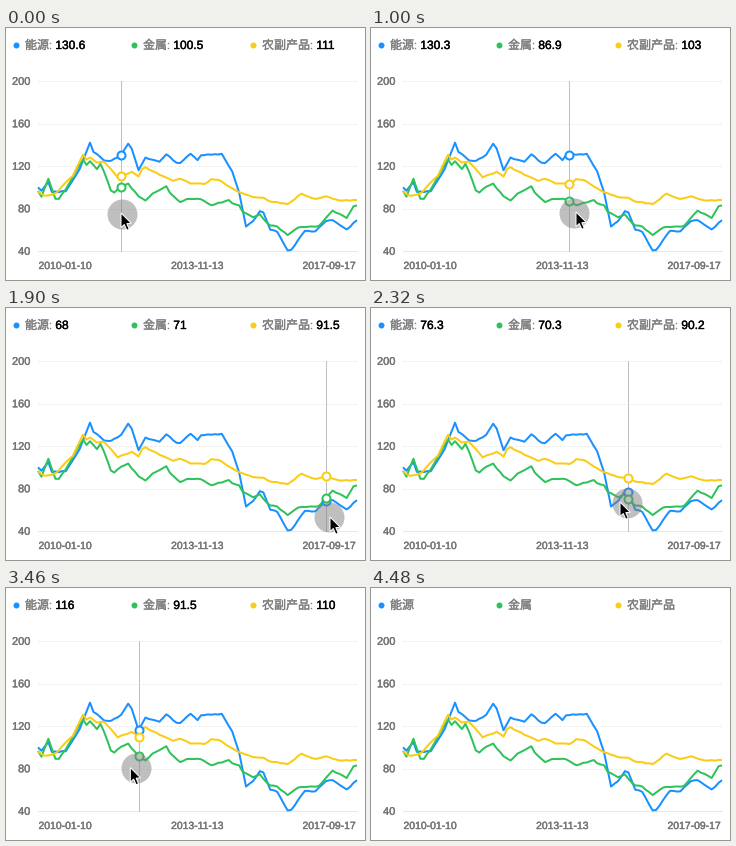
Animation of 359 by 252 pixels, one loop 5440 ms. Source, as a matplotlib script:

```python
import numpy as np
import matplotlib.pyplot as plt
from matplotlib.animation import FuncAnimation
from matplotlib.patches import Polygon
from matplotlib.patheffects import withStroke

W, H, DPI = 359, 252, 100
PX = 72 / DPI
LOOP, STEP = 5440, 20
LEFT, RIGHT, TOP, BOTTOM = 32, 351, 53, 223
MONTHS = 93
LATIN, CJK = "Liberation Sans", "Noto Sans CJK JP"
GREY, TICK = "#808080", "#757575"

# turning points of each price index: (month, value)
ENERGY = [
    (0, 99.9), (1, 96.7), (3, 104.7), (4, 95.6), (8, 96.2), (12, 117),
    (15, 142), (16, 133.2), (17, 131.2), (19, 125.3), (21, 124.8),
    (24, 130.6), (26, 141), (27, 136.5), (29, 116), (31, 128), (33, 125.9),
    (35, 124), (37, 131), (40, 123), (41, 122.8), (44, 131.5), (46, 125.5),
    (47, 130), (53, 131.5), (56, 115), (58, 95), (60, 63), (62, 68.1),
    (64, 77.5), (65, 76.3), (67, 60), (69, 58), (72, 40.5), (73, 41),
    (77, 59), (80, 58.5), (83, 68), (85, 69), (89, 60.3), (92, 69),
]
METAL = [
    (0, 96.6), (1, 91.1), (3, 108), (5, 89.2), (6, 89), (8, 98), (12, 120.8),
    (13, 126), (14, 121), (15, 124.5), (17, 117), (18, 122), (19, 115),
    (21, 97), (22, 95), (24, 100.5), (26, 103.5), (29, 91.5), (31, 87.5),
    (33, 94), (37, 101), (38, 95), (41, 86), (43, 89), (47, 88.7), (50, 83),
    (55, 88), (56, 85), (58, 83), (59, 77), (62, 71.8), (64, 74.5),
    (65, 70.3), (67, 64), (69, 63), (72, 55), (75, 62), (81, 63.5),
    (85, 78), (89, 71), (91, 82), (92, 83),
]
FARM = [
    (0, 96.2), (2, 92), (5, 94), (8, 104.5), (10, 110.5), (12, 124.3),
    (13, 130.5), (14, 126), (15, 128), (17, 123.2), (19, 124), (23, 109.2),
    (24, 111), (27, 114.5), (29, 110), (30, 117), (31, 119), (33, 115.2),
    (36, 110.5), (39, 106), (41, 108), (44, 103.5), (48, 103), (50, 107.7),
    (52, 107), (57, 97), (62, 90.7), (65, 90.2), (67, 86.5), (69, 86),
    (72, 84), (76, 94), (80, 89), (83, 91.5), (87, 87.5), (92, 88),
]

rng = np.random.default_rng(7)


def monthly(keys, ripple=.5):
    """Straight runs between turning points with a small seeded ripple."""
    months, levels = zip(*keys)
    data = np.interp(range(MONTHS), months, levels)
    noise = rng.uniform(-ripple, ripple, MONTHS)
    noise[list(months)] = 0
    return np.round(data + noise, 1)


SERIES = [
    ("能源", "#1890ff", monthly(ENERGY), 10),
    ("金属", "#2fc25b", monthly(METAL), 128),
    ("农副产品", "#facc14", monthly(FARM), 247),
]

# pointer path: time (ms), x, y, horizontal speed (px/ms)
KEYS = np.array([
    (0, 115, 185, 0), (340, 70, 184, 0), (640, 101, 184, .16),
    (1000, 205, 184, 0), (1240, 205, 184, 0), (1540, 258, 186, .16),
    (1900, 324, 209, 0), (2320, 249, 194, -.12), (2740, 145, 180, 0),
    (3160, 145, 180, 0), (3820, 61, 179, -.21), (4040, 14, 184, 0),
    (4240, 51, 182, 0), (4360, 51, 182, 0), (4400, 8, 207, 0),
])
CIRCLE_LAG, GUIDE_LAG = 40, 60
RELEASE, LEAVE = 4300, 4480


def y_of(value):
    return BOTTOM - (np.asarray(value) - 40) * (BOTTOM - TOP) / 160


def pointer(t):
    """Hermite position of the pointer at time t."""
    t = np.clip(t, KEYS[0, 0], KEYS[-1, 0])
    i = min(np.searchsorted(KEYS[:, 0], t, "right") - 1, len(KEYS) - 2)
    (t0, x0, y0, v0), (t1, x1, y1, v1) = KEYS[i], KEYS[i + 1]
    span = t1 - t0
    u = (t - t0) / span
    ease = u * u * (3 - 2 * u)
    bend = span * u * (1 - u) * (v0 * (1 - u) - v1 * u)
    return x0 + (x1 - x0) * ease + bend, y0 + (y1 - y0) * ease


fig = plt.figure(figsize=(W / DPI, H / DPI), dpi=DPI, facecolor="white")
ax = fig.add_axes([0, 0, 1, 1])
ax.set(xlim=(0, W), ylim=(H, 0))
ax.axis("off")


def label(x, y, text, size, color=GREY, font=LATIN, ha="left"):
    # a hairline outline gives a medium weight
    return ax.text(x, y, text, fontsize=size * PX, color=color,
                   family=[font, CJK], ha=ha, va="baseline", zorder=1,
                   path_effects=[withStroke(linewidth=.4 * PX,
                                            foreground=color)])


def dot(size, color, zorder, **kw):
    return ax.plot([], [], "o", ms=size * PX, color=color, zorder=zorder,
                   snap=False, **kw)[0]


for tick in range(40, 201, 40):
    y = float(y_of(tick))
    style = "-" if tick == 40 else (0, (2, 2))
    ax.plot([LEFT, RIGHT], [y, y], color="#e8e8e8", lw=PX, ls=style, zorder=0)
    label(24.3, y + 3.8, str(tick), 11, TICK, ha="right")

for x, date, ha in [(32.5, "2010-01-10", "left"),
                    (191.5, "2013-11-13", "center"),
                    (350, "2017-09-17", "right")]:
    label(x, 241, date, 10.4, TICK, ha=ha)

xs = np.linspace(LEFT, RIGHT, MONTHS)
values, marks = [], []
for k, (name, color, data, x) in enumerate(SERIES):
    ax.plot(xs, y_of(data), color=color, lw=2 * PX, zorder=2 + k * .1,
            solid_joinstyle="round", solid_capstyle="butt")
    dot(6, color, 1, mew=0).set_data([x], [17])
    label(x + 9, 21, name, 12, font=CJK)
    end = x + 9 + 12 * len(name)
    values.append((label(end - .3, 21, ":", 12),
                   label(end + 6.3, 21, "", 12, "black")))
    marks.append(dot(8, color, 4 + k * .1, mfc="white", mew=2 * PX))

guide, = ax.plot([], [], color="#bfbfbf", lw=PX, zorder=3)
touch = dot(30, GREY, 6, mew=0, alpha=.5)
ARROW = np.array([(0, 0), (0, 14.6), (3.3, 11.5), (5.8, 17.2),
                  (8.2, 16.2), (5.8, 10.6), (10.3, 10.3)])
arrow = Polygon(ARROW, fc="black", ec="white", lw=PX, zorder=7)
ax.add_patch(arrow)


def held(t):
    """Time of the last pointer refresh (every 60 ms)."""
    return t // 60 * 60 if t < 580 else (t - 40) // 60 * 60 + 40


def draw(frame):
    t = held(frame * STEP)
    active, present = t < RELEASE, t < LEAVE

    px, _ = pointer(t - GUIDE_LAG)
    i = int(np.clip(round((px - LEFT) / (xs[1] - xs[0])), 0, MONTHS - 1))
    guide.set_data([xs[i]] * 2, [TOP, BOTTOM])
    guide.set_visible(active)
    for (_, _, data, _), mark, (colon, value) in zip(SERIES, marks, values):
        mark.set_data([xs[i]], [y_of(data[i])])
        value.set_text(f"{data[i]:g}")
        for part in (mark, colon, value):
            part.set_visible(active)

    cx, cy = pointer(t - CIRCLE_LAG)
    touch.set_data([cx + 1], [cy + .5])
    arrow.set_xy(ARROW + pointer(t))
    touch.set_visible(present)
    arrow.set_visible(present)
    return [guide, touch, arrow, *marks]


anim = FuncAnimation(fig, draw, frames=LOOP // STEP, interval=STEP,
                     repeat=True, repeat_delay=0, blit=False)
plt.show()
```
